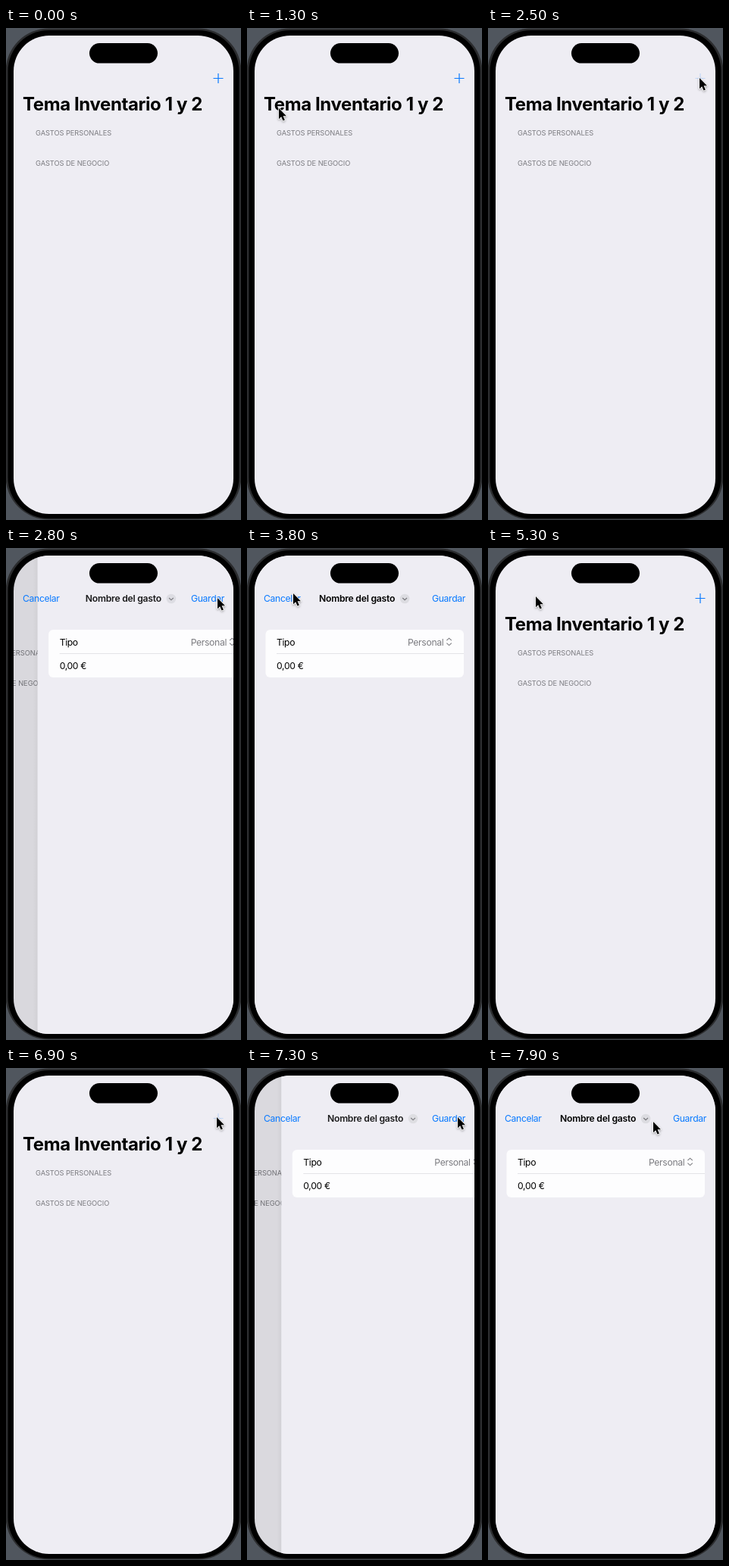
These frames come from a looping animation (310 by 650 pixels, 8000 ms). An HTML page with a canvas:

```html
<!DOCTYPE html>
<html lang="es">
<head>
<meta charset="utf-8">
<title>Gastos</title>
<style>
html, body { margin: 0; width: 100%; height: 100%; overflow: hidden; background: #50565e; }
canvas { display: block; width: 310px; height: 650px; }
</style>
</head>
<body>
<canvas id="stage"></canvas>
<script>
const W = 310, H = 650, LOOP = 8000, STEP = 100;
const SCREEN = { x: 10, y: 10, w: 290, h: 632, r: 47 };
const BLUE = '#0a7aff', PAGE = '#eeedf3', GREY = '#7c7c81';
const FONT = 'Inter, "Open Sans", sans-serif';

const canvas = document.getElementById('stage');
const ctx = canvas.getContext('2d');
const dpr = window.devicePixelRatio || 1;
canvas.width = W * dpr;
canvas.height = H * dpr;

// Pointer tip: time, x, y
const pointerPath = [
  [600, 150, 604], [700, 208, 176], [800, 257, 112], [1300, 42, 106],
  [1400, 54, 107], [2100, 256, 106], [2300, 279, 66], [2800, 279, 66],
  [3300, 96, 67], [3600, 62, 61], [3800, 61, 60], [4000, 58, 60],
  [4200, 63, 64], [5500, 63, 64], [6000, 165, 54], [6400, 265, 60],
  [6900, 278, 65], [7300, 278, 65], [7900, 218, 71]
];

const clamp = v => Math.max(0, Math.min(1, v));
const within = (t, a, b) => t >= a && t < b;

function spring(ms) {
  if (ms <= 0) return 0;
  const k = ms * 0.014;
  const p = 1 - (1 + k) * Math.exp(-k);
  return p > 0.99 ? 1 : p;
}

// 0 = list, 1 = form
function pushed(t) {
  if (t >= 7000) return spring(t - 7040);
  if (t >= 4700) return 1 - spring(t - 4730);
  return spring(t - 2530);
}

function pointerAt(t) {
  if (t < pointerPath[0][0]) return null;
  for (let i = 1; i < pointerPath.length; i++) {
    const [t0, x0, y0] = pointerPath[i - 1], [t1, x1, y1] = pointerPath[i];
    if (t <= t1) {
      const f = (t - t0) / (t1 - t0);
      return [x0 + (x1 - x0) * f, y0 + (y1 - y0) * f];
    }
  }
  return pointerPath[pointerPath.length - 1].slice(1);
}

function box(x, y, w, h, r, color) {
  ctx.beginPath();
  ctx.roundRect(x, y, w, h, r);
  ctx.fillStyle = color;
  ctx.fill();
}

function line(points, color, width) {
  ctx.beginPath();
  points.forEach(([x, y], i) => i ? ctx.lineTo(x, y) : ctx.moveTo(x, y));
  ctx.strokeStyle = color;
  ctx.lineWidth = width;
  ctx.stroke();
}

function label(str, x, y, color = '#000', size = 12.2, weight = 400, spacing = -0.35) {
  ctx.font = `${weight} ${size}px ${FONT}`;
  ctx.letterSpacing = spacing + 'px';
  ctx.fillStyle = color;
  ctx.fillText(str, x, y);
}

function layer(dx, alpha, draw) {
  if (alpha <= 0) return;
  ctx.save();
  ctx.translate(dx, 0);
  ctx.globalAlpha = alpha;
  draw();
  ctx.restore();
}

function drawList() {
  label('GASTOS PERSONALES', 39, 141.5, GREY, 9.3, 400, -0.07);
  label('GASTOS DE NEGOCIO', 39, 182, GREY, 9.3, 400, -0.07);
}

function drawForm() {
  const edge = ctx.createLinearGradient(4, 0, 10, 0);
  edge.addColorStop(0, 'rgba(0,0,0,0)');
  edge.addColorStop(1, 'rgba(0,0,0,0.04)');
  ctx.fillStyle = edge;
  ctx.fillRect(4, 10, 6, 632);
  ctx.fillStyle = PAGE;
  ctx.fillRect(10, 10, 290, 632);
  box(24.5, 108, 261.5, 63, 6, '#fdfdfe');
  line([[39, 139.5], [286, 139.5]], '#dedee1', 0.8);
  label('Tipo', 39, 128.5);
  label('Personal', 212, 128.5, GREY);
  line([[263.4, 122.2], [266.6, 119.2], [269.8, 122.2]], GREY, 1.1);
  line([[263.4, 125.6], [266.6, 128.6], [269.8, 125.6]], GREY, 1.1);
  label('0,00 €', 39, 160);
}

function drawFormTitle() {
  label('Nombre del gasto', 95, 71, '#000', 12.2, 600, -0.25);
  box(201.8, 60.7, 12.6, 12.6, 6.3, '#dcdce1');
  line([[205.2, 66], [208.1, 68.7], [211, 66]], '#77777c', 1.2);
}

function drawPlus() {
  line([[273.5, 66.5], [286.5, 66.5]], BLUE, 1.2);
  line([[280, 60], [280, 73]], BLUE, 1.2);
}

function drawScreen(t) {
  const q = pushed(t);
  const tapPlus = within(t, 2500, 3200) || within(t, 6900, 7700);
  const tapCancel = within(t, 4700, 5300);

  ctx.save();
  ctx.beginPath();
  ctx.roundRect(SCREEN.x, SCREEN.y, SCREEN.w, SCREEN.h, SCREEN.r);
  ctx.clip();
  ctx.fillStyle = PAGE;
  ctx.fillRect(0, 0, W, H);

  layer(-87 * q, 1, drawList);
  layer(-87 * q, clamp(1 - 1.6 * q), () =>
    label('Tema Inventario 1 y 2', 22, 108.5, '#000', 24, 700, -0.4));
  ctx.fillStyle = `rgba(0,0,0,${0.1 * q})`;
  ctx.fillRect(0, 0, W, H);

  if (q > 0) layer(SCREEN.w * (1 - q), 1, drawForm);
  layer(90 * (1 - q), q, drawFormTitle);
  const shown = clamp(1.35 * q);
  layer(0, shown * (tapCancel ? 0.2 : 1), () => label('Cancelar', 22, 71, BLUE));
  layer(0, shown, () => label('Guardar', 244, 71, BLUE));
  layer(0, clamp(1 - 1.7 * q) * (tapPlus ? 0.2 : 1), drawPlus);
  ctx.restore();
}

function drawPhone() {
  ctx.fillStyle = '#50565e';
  ctx.fillRect(0, 0, W, H);
  box(-0.5, 0.5, 311, 649, 57, '#2b2c2e');
  box(2.5, 3, 305, 645, 54, '#000');
}

function drawPointer([x, y]) {
  const arrow = new Path2D('M0 0V14.2L3.2 11.2L5.5 16.6L7.9 15.6L5.6 10.3H10Z');
  ctx.save();
  ctx.translate(x, y);
  ctx.lineJoin = 'round';
  ctx.shadowColor = 'rgba(0,0,0,0.35)';
  ctx.shadowBlur = 3 * dpr;
  ctx.shadowOffsetY = 1.2 * dpr;
  ctx.strokeStyle = '#fff';
  ctx.lineWidth = 1.6;
  ctx.stroke(arrow);
  ctx.shadowColor = 'transparent';
  ctx.fillStyle = '#000';
  ctx.fill(arrow);
  ctx.restore();
}

function render(t) {
  ctx.setTransform(dpr, 0, 0, dpr, 0, 0);
  drawPhone();
  drawScreen(t);
  box(110, 20, 90, 26.6, 13.3, '#000');
  const tip = pointerAt(t);
  if (tip) drawPointer(tip);
}

const start = performance.now();
function tick() {
  const t = (performance.now() - start) % LOOP;
  render(Math.floor(t / STEP) * STEP);
  requestAnimationFrame(tick);
}
tick();
</script>
</body>
</html>
```
